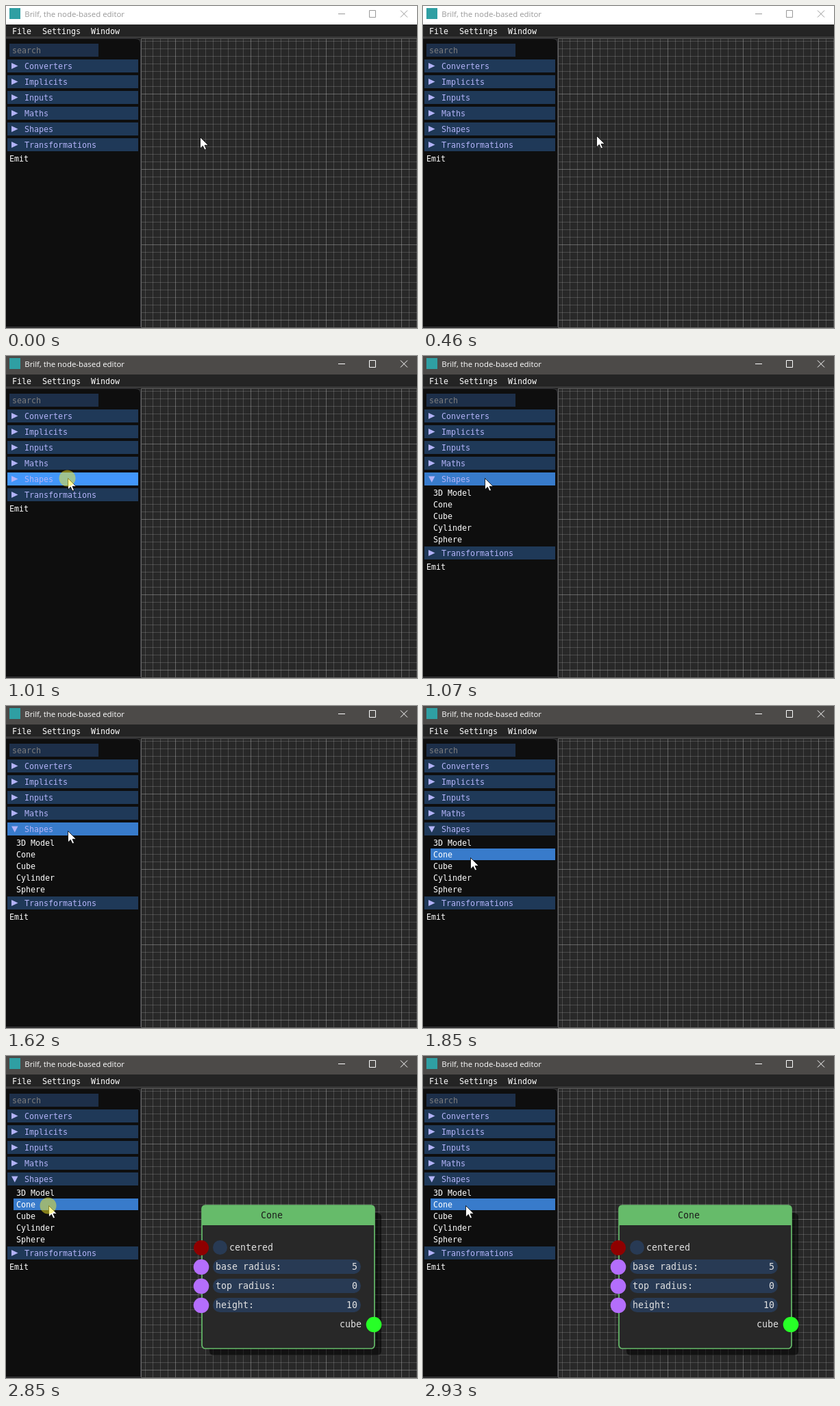
Recreate the animation shown at these times as an HTML page. Size 600x470 px, loop 3.78 s.

```html
<!DOCTYPE html>
<html lang="en">
<head>
<meta charset="utf-8">
<title>Node editor</title>
<style>
  html, body { margin: 0; width: 100%; height: 100%; overflow: hidden; background: #242424; }
  svg { display: block; width: 600px; height: 470px; }
  text { font: 11.64px "DejaVu Sans Mono", monospace; fill: #fff; white-space: pre; }
  .head { fill: #b3b3f8; }
  .title { font: 11.42px "Open Sans", sans-serif; text-anchor: end; fill: #999; }
  .buttons { stroke: #999; fill: none; }
  .bar { fill: #fff; }
  .active .title { fill: #fff; }
  .active .buttons { stroke: #fff; }
  .active .bar { fill: #4c4a48; }
  #node text { font-size: 13.29px; fill: #e2e2e2; }
  #node .end { text-anchor: end; }
  #node .name { fill: #1c1c1c; }
</style>
</head>
<body>
<svg id="stage" viewBox="0 0 600 470">
  <rect width="600" height="470" fill="#242424"/>
  <rect class="bar" width="600" height="27"/>
  <rect x="5" y="3" width="16" height="16" fill="#2f9fa3"/>
  <text class="title" x="173" y="16">Brilf, the node-based editor</text>
  <path class="buttons" d="M485 11.5H495M530.5 6.5H539.5V16.5H530.5ZM576 6.5L586 16.5M586 6.5L576 16.5"/>
  <text x="9" y="41">File</text>
  <text x="53" y="41">Settings</text>
  <text x="124" y="41">Window</text>
  <path d="M0 45.5H600" stroke="#505050"/>

  <path d="M0 47.5H189Q196.500 47.500 196.500 55V468.500H0" fill="#0e0e0e" stroke="#3c3c40"/>
  <rect x="5" y="55" width="130" height="19" fill="#1d2f49"/>
  <text x="9" y="69" style="fill:#7d7d7d">search</text>
  <g id="heads"></g>
  <g id="rest"><text x="5" y="227">Emit</text></g>
  <rect id="hover"/>
  <text class="head" x="27" y="184">Shapes</text>
  <path id="arrow" fill="#b3b3f8"/>
  <g id="items"></g>

  <rect x="197" y="47" width="403" height="422" fill="#282828"/>
  <g id="grid" fill="#c8c8c8" shape-rendering="crispEdges"></g>
  <path d="M600 47.500H197.500V469.500H600" fill="none" stroke="#666"/>

  <g id="node">
    <rect x="297" y="229" width="251" height="208" rx="6" opacity=".55"/>
    <rect x="286" y="218" width="252" height="209" rx="5" fill="#282828"/>
    <path d="M286 247V223Q286 218 291 218H533Q538 218 538 223V247Z" fill="#66bb6a"/>
    <rect x="286" y="218" width="252" height="209" rx="5" fill="none" stroke="#66bb6a" stroke-width="1.700"/>
    <text class="name" x="372" y="237">Cone</text>
    <circle cx="285" cy="280" r="11" fill="#8f0000"/>
    <circle cx="312.500" cy="279.500" r="10.500" fill="#283a54"/>
    <text x="326" y="284">centered</text>
    <g id="fields"></g>
    <text class="end" x="519" y="396">cube</text>
    <circle cx="537" cy="392" r="11.300" fill="#27ff27"/>
  </g>

  <path id="cursor" d="M.5 .5V17L4.300 13.300L7 19L9.500 18L7 12.300H12.300Z" fill="#fff" stroke="#000" stroke-width=".8"/>
  <circle id="click" r="12" fill="rgb(250,238,40)" opacity=".5"/>
</svg>
<script>
const LOOP = 3780;
const $ = id => document.getElementById(id);
const add = (id, html) => $(id).insertAdjacentHTML('beforeend', html);
const show = (id, on) => $(id).setAttribute('visibility', on ? 'visible' : 'hidden');
const set = (id, attrs) => {
  for (const key in attrs) $(id).setAttribute(key, attrs[key]);
};

const rightArrow = y => `M8 ${y + 5}L17.500 ${y + 9.5}L8 ${y + 14}Z`;
const bar = y => `<rect x="2" y="${y}" width="191" height="19" fill="#1f3958"/>`;
const header = (label, y) => `${bar(y)}
  <path d="${rightArrow(y)}" fill="#b3b3f8"/>
  <text class="head" x="27" y="${y + 14}">${label}</text>`;

['Converters', 'Implicits', 'Inputs', 'Maths'].forEach((label, i) =>
  add('heads', header(label, 78 + 23 * i)));
add('heads', bar(170));
add('rest', header('Transformations', 193));

['3D Model', 'Cone', 'Cube', 'Cylinder', 'Sphere'].forEach((label, i) =>
  add('items', `<text x="15" y="${204 + 17 * i}">${label}</text>`));

[['base radius:', 5], ['top radius:', 0], ['height:', 10]].forEach(([label, value], i) => {
  const y = 308 + 28 * i;
  add('fields', `<circle cx="285" cy="${y}" r="11.300" fill="#b46efc"/>
    <rect x="302" y="${y - 11}" width="216" height="21" rx="10.500" fill="#283a54"/>
    <text x="306" y="${y + 4}">${label}</text>
    <text class="end" x="513" y="${y + 4}">${value}</text>`);
});

const shade = major => major ? 0.38 : 0.22;
for (let x = 203; x < 600; x += 11)
  add('grid', `<rect x="${x}" y="48" width="1" height="421" opacity="${shade(x % 110 === 27)}"/>`);
for (let y = 51; y < 469; y += 11)
  add('grid', `<rect x="198" y="${y}" width="402" height="1" opacity="${shade(y % 110 === 18)}"/>`);

// Each move: start time, step length, step count, end x, end y
const moves = [
  [460, 80, 4, 90, 178],
  [1620, 80, 1, 90, 182],
  [1700, 75, 3, 69, 221],
  [1930, 80, 2, 66, 226],
  [2160, 80, 2, 62, 218]
];

function pointer(t) {
  let x = 283, y = 191;
  for (const [start, step, count, toX, toY] of moves) {
    if (t < start) break;
    const p = Math.min(1, (Math.floor((t - start) / step) + 1) / count);
    const eased = p * p * (3 - 2 * p);
    x += (toX - x) * eased;
    y += (toY - y) * eased;
  }
  return [Math.round(x), Math.round(y)];
}

function draw(now) {
  const t = now % LOOP;
  const [x, y] = pointer(t);
  const open = t >= 1070;
  const pressed = t >= 1010 && !open;
  const onItem = open && y >= 191;

  $('stage').classList.toggle('active', t >= 1010);
  set('rest', { transform: `translate(0 ${open ? 85 : 0})` });
  set('arrow', { d: open ? 'M8 175.500H17.500L12.750 184.500Z' : rightArrow(170) });
  set('hover', {
    x: onItem ? 11 : 2,
    y: onItem ? 191 + 17 * Math.floor((y - 191) / 17) : 170,
    width: onItem ? 182 : 191,
    height: onItem ? 17 : 19,
    fill: pressed ? '#4296fa' : '#387bcb'
  });
  set('cursor', { transform: `translate(${x} ${y})` });
  set('click', { cx: x - 0.5, cy: y + 0.5 });
  show('hover', x < 193);
  show('items', open);
  show('click', pressed || (t >= 2770 && t < 2930));
  show('node', t >= 2850);
}

const begin = performance.now();
function tick() {
  draw(performance.now() - begin);
  requestAnimationFrame(tick);
}
tick();
</script>
</body>
</html>
```
